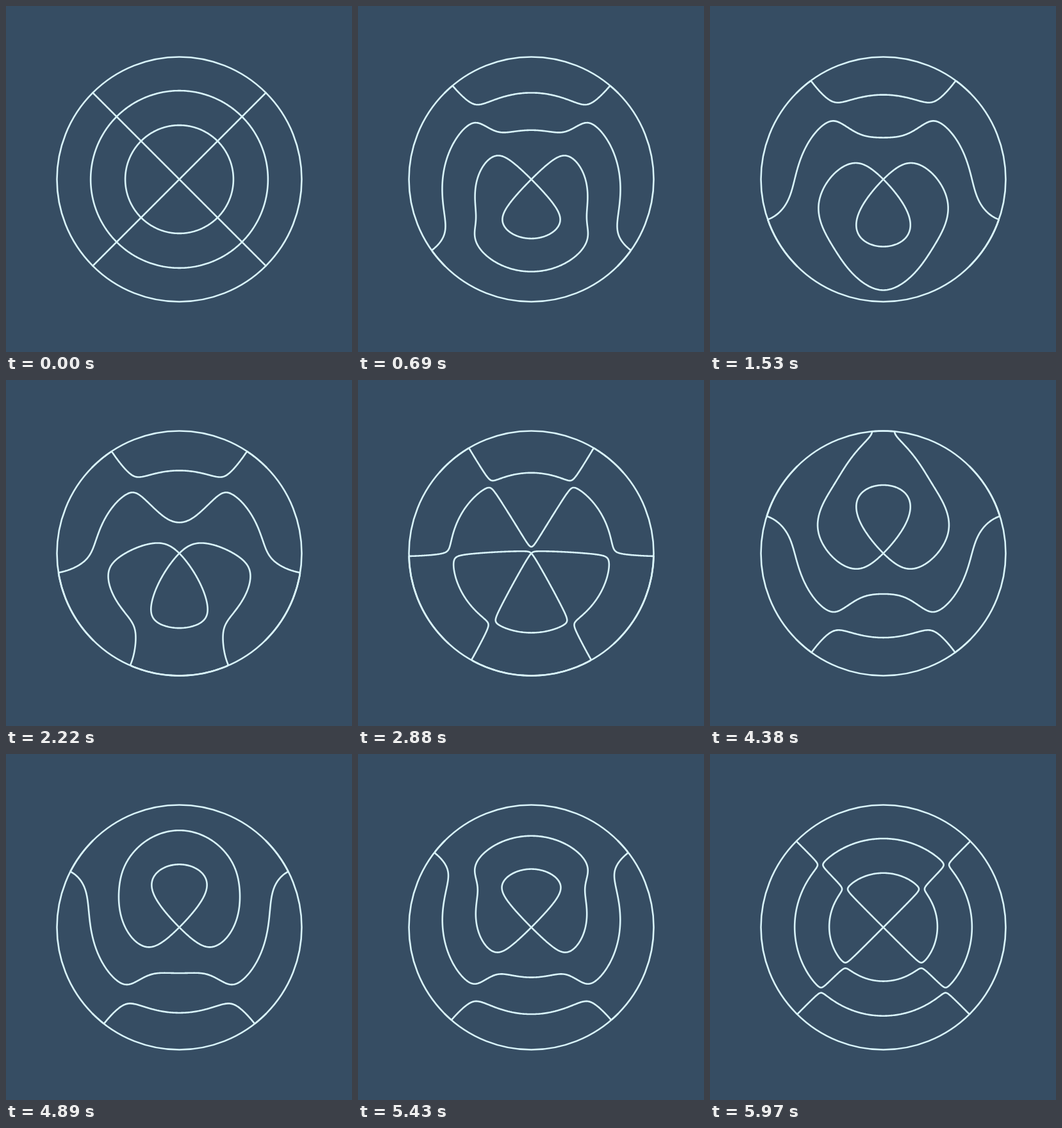
An HTML page with a canvas for the animation above (6 s loop, 540 by 540 pixels).

```html
<!DOCTYPE html>
<html>
<head>
<meta charset="utf-8">
<title>Nodal lines of a round drum</title>
<style>
html, body { margin: 0; height: 100%; overflow: hidden; background: #364d63; }
canvas { display: block; }
</style>
</head>
<body>
<canvas id="stage" width="540" height="540"></canvas>
<script>
const ctx = document.getElementById('stage').getContext('2d');
const LOOP = 6000, STEP = 30;
const CENTER = 270.5, RADIUS = 191;
const RINGS = 160, SPOKES = 500;
const ROOT2 = 11.61984117, ROOT3 = 9.76102313; // third zero of J2, second zero of J3

// Bessel function of the first kind, from its integral form
function bessel(n, x) {
  const N = 64;
  let sum = 0;
  for (let i = 0; i < N; i++) {
    const a = (i + 0.5) * Math.PI / N;
    sum += Math.cos(n * a - x * Math.sin(a));
  }
  return sum / N;
}

const rings = Array.from({ length: RINGS + 1 }, (_, i) => {
  const q = Math.max(i, 0.1) / RINGS;
  return { r: q * RADIUS, j2: bessel(2, ROOT2 * q), j3: bessel(3, ROOT3 * q) };
});
const spokes = Array.from({ length: SPOKES + 1 }, (_, i) => {
  const a = i * 2 * Math.PI / SPOKES;
  return { x: Math.cos(a), y: Math.sin(a), c2: Math.cos(2 * a), s3: Math.sin(3 * a) };
});
const field = new Float64Array((RINGS + 1) * (SPOKES + 1));
const at = (i, k) => field[i * (SPOKES + 1) + k];

// Zero crossing between two grid corners, as a point on the stage
function crossing(i, k, i2, k2) {
  const u = at(i, k), f = u / (u - at(i2, k2));
  const r = rings[i].r + (rings[i2].r - rings[i].r) * f;
  const p = spokes[k], q = spokes[k2];
  return [CENTER + r * (p.x + (q.x - p.x) * f), CENTER + r * (p.y + (q.y - p.y) * f)];
}

function traceCell(i, k) {
  const a = at(i, k) > 0, b = at(i + 1, k) > 0;
  const c = at(i + 1, k + 1) > 0, d = at(i, k + 1) > 0;
  if (a === b && b === c && c === d) return;
  const pts = [];
  if (a !== b) pts.push(crossing(i, k, i + 1, k));
  if (b !== c) pts.push(crossing(i + 1, k, i + 1, k + 1));
  if (c !== d) pts.push(crossing(i + 1, k + 1, i, k + 1));
  if (d !== a) pts.push(crossing(i, k + 1, i, k));
  for (let n = 0; n < pts.length; n += 2) {
    ctx.moveTo(...pts[n]);
    ctx.lineTo(...pts[n + 1]);
  }
}

function draw(time) {
  const phase = Math.PI * time / LOOP;
  const w2 = Math.cos(phase), w3 = Math.sin(phase);
  let n = 0;
  for (const ring of rings) {
    const a = w2 * ring.j2, b = w3 * ring.j3;
    for (const s of spokes) field[n++] = a * s.c2 + b * s.s3;
  }

  ctx.fillStyle = '#364d63';
  ctx.fillRect(0, 0, 540, 540);
  ctx.strokeStyle = '#d9f4fa';
  ctx.lineWidth = 2.6;
  ctx.lineCap = ctx.lineJoin = 'round';
  ctx.beginPath();
  for (let i = 0; i < RINGS; i++)
    for (let k = 0; k < SPOKES; k++) traceCell(i, k);
  ctx.stroke();
  ctx.beginPath();
  ctx.arc(CENTER, CENTER, RADIUS, 0, 2 * Math.PI);
  ctx.stroke();
}

let shown = -1;
function tick(now) {
  const time = Math.floor((now + 1) / STEP) * STEP % LOOP;
  if (time !== shown) draw(shown = time);
  requestAnimationFrame(tick);
}
draw(0);
requestAnimationFrame(tick);
</script>
</body>
</html>
```
